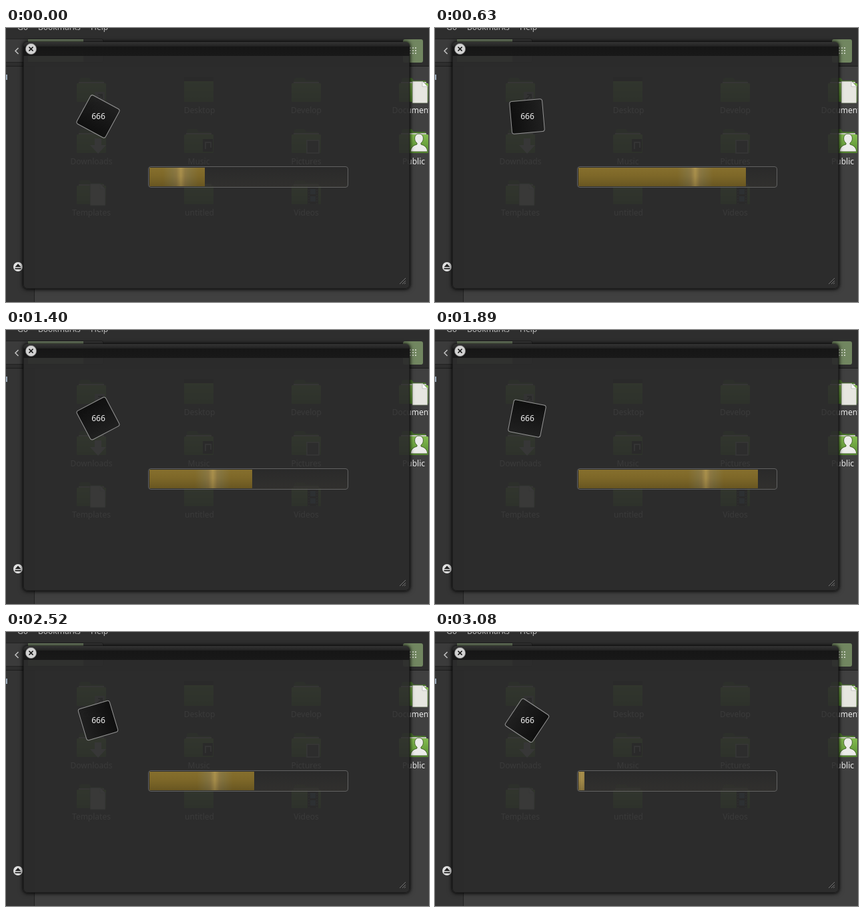
Write an HTML page that moves like this. It is 634x412 px and loops after 3.15 s.

```html
<!DOCTYPE html>
<html lang="en">
<head>
<meta charset="utf-8">
<title>Progress overlay</title>
<style>
html, body { margin: 0; width: 100%; height: 100%; overflow: hidden; background: #404040; }
body { position: relative; font: 12px "Noto Sans", "Open Sans", sans-serif; }
body * { box-sizing: border-box; }
svg, div { position: absolute; }
svg { left: 0; top: 0; }
#win {
  left: 26px; top: 21px; width: 579px; height: 371px; border-radius: 6px;
  background: rgba(44, 44, 44, .93);
  box-shadow: 0 0 4px 1px rgba(0, 0, 0, .75), 0 1px 8px rgba(0, 0, 0, .4);
  border: 1px solid rgba(20, 20, 20, .5);
}
#title {
  left: 26px; top: 21px; width: 579px; height: 21px; border-radius: 6px 6px 0 0;
  background: linear-gradient(rgba(52, 52, 52, .9), rgba(36, 36, 36, .9) 28%, rgba(20, 20, 20, .92) 36%, rgba(23, 23, 23, .92));
}
#track {
  left: 213px; top: 208px; width: 300px; height: 32px; border-radius: 4px;
  border: 1px solid #626262;
  background: linear-gradient(rgba(40, 40, 40, .5), rgba(54, 52, 48, .5));
}
#fill { left: 215px; top: 210px; height: 28px; overflow: hidden; background: #7d6728; }
#glow {
  top: 0; width: 54px; height: 28px;
  background: linear-gradient(90deg, #7d6728, #80703c 28%, #887440 38%, #a68d4a 50%, #887440 62%, #80703c 72%, #7d6728);
}
#shade {
  left: 0; top: 0; width: 100%; height: 100%;
  background: linear-gradient(rgba(255, 220, 120, .07), transparent 45%, rgba(0, 0, 0, .16));
}
#tile {
  left: 112.7px; top: 107.7px; width: 50px; height: 50px; border-radius: 4px;
  border: 1px solid #949494;
  background: linear-gradient(rgba(30, 30, 30, .85), rgba(10, 10, 10, .85));
}
#count {
  left: 113px; top: 125px; width: 51px; text-align: center;
  line-height: 16px; font-weight: 500; color: #f4f4f4;
}
</style>
</head>
<body>
<svg id="desk" width="634" height="412"></svg>
<div id="win"></div>
<div id="title"></div>
<svg width="634" height="412" fill="none">
  <circle cx="37.5" cy="31.5" r="8.2" fill="#d2d2d2" stroke="#666" stroke-width=".8"/>
  <path d="M34.5 28.5l6 6m0-6l-6 6" stroke="#111" stroke-width="1.7"/>
  <path d="M590 385l9-9m-5 9l5-5m-2 5l2-2" stroke="#757575"/>
</svg>
<div id="track"></div>
<div id="fill"><div id="glow"></div><div id="shade"></div></div>
<div id="tile"></div>
<div id="count">666</div>
<script>
const $ = id => document.getElementById(id);
const rect = (x, y, w, h, fill, extra = '') =>
  `<rect x="${x}" y="${y}" width="${w}" height="${h}" fill="${fill}" ${extra}/>`;
const path = (d, fill, extra = '') => `<path d="${d}" fill="${fill}" ${extra}/>`;
const text = (x, y, s, anchor = 'middle', fill = '#eee') =>
  `<text x="${x}" y="${y}" text-anchor="${anchor}" fill="${fill}">${s}</text>`;

// Emblems are drawn relative to the folder's top left corner.
const page = path('M20 5h15l8 8v25H20z', '#e6e6e0', 'stroke="#55604a" stroke-width=".8"') +
  path('M35 5v8h8z', '#fafaf8', 'stroke="#aaa" stroke-width=".6"');
const emblems = {
  Code: rect(27, 21, 15, 15, '#999') + path('M30 33l8-8m-6 0h6v6', 'none', 'stroke="#222" stroke-width="2"'),
  Documents: page,
  Templates: page,
  Downloads: path('M27 14h10v10h7L32 37 20 24h7z', '#d4d4d4'),
  Music: rect(28, 15, 15, 19, '#222') + path('M32 30v-10h8v8', 'none', 'stroke="#aaa" stroke-width="2"'),
  Pictures: rect(23, 17, 18, 19, '#444', 'stroke="#ccc" stroke-width="1.5"'),
  Public: path('M30 7c8 0 8 11 3 14v2q9 2 10 11H17q1-9 10-11v-2c-5-3-5-14 3-14z',
    '#ececea', 'stroke="#46652c"'),
  Videos: rect(24, 9, 16, 27, '#222') + path('M26 10v26m12-26v26', 'none', 'stroke="#999" stroke-dasharray="2 2"') +
    rect(28, 13, 8, 8, '#48748f') + rect(28, 24, 8, 8, '#48748f')
};
const names = ['Code', 'Desktop', 'Develop', 'Documents', 'Downloads', 'Music',
  'Pictures', 'Public', 'Templates', 'untitled', 'Videos'];

function folder(name, i) {
  const x = 128 + i % 4 * 161, y = 75 + Math.floor(i / 4) * 77;
  const body = name === 'Desktop'
    ? rect(0, -1, 44, 37, 'url(#green)') + rect(0, -1, 44, 6, '#202020')
    : path('M4 3q0-3 3-3h12l3 4h18v10H4z', '#46702a') +
      rect(3, 6, 38, 5, '#c4c8bc') + rect(0, 8, 44, 28, 'url(#green)', 'rx="1.5"');
  return `<g transform="translate(${x - 22} ${y})">${body}${emblems[name] || ''}</g>` +
    text(x + (name === 'Desktop' || name === 'untitled' ? 1 : 0), y + 53, name);
}

let dots = '';
for (let i = 0; i < 9; i++) dots += rect(605 + i % 3 * 4, 29 + Math.floor(i / 3) * 4, 2, 2, '#c4ccba');

$('desk').innerHTML =
  '<defs><linearGradient id="green" x2="0" y2="1"><stop stop-color="#84bc50"/>' +
  '<stop offset="1" stop-color="#568c30"/></linearGradient></defs>' +
  rect(0, 0, 634, 57, '#2e2e2e') + rect(0, 57, 634, 1, '#1d1d1d') +
  rect(0, 58, 42, 354, '#343434') + rect(42, 58, 1, 354, '#222') +
  [[17, 'Go'], [48, 'Bookmarks'], [127, 'Help']].map(([x, s]) => text(x, 2.5, s, 'start', '#bbb')).join('') +
  rect(-4, 16.5, 150, 35, '#3b3b3b', 'rx="3" stroke="#222"') +
  rect(33, 17, 83, 34, '#75866a') +
  path('M18.5 30l-4.5 4.5 4.5 4.5', 'none', 'stroke="#c4c4c4" stroke-width="1.5"') +
  rect(595, 17, 30, 35, '#718660', 'rx="3"') + dots +
  rect(0, 70, 2, 8, '#9aa9b8') +
  '<circle cx="18" cy="359" r="7" fill="#e2e2e2"/>' +
  path('M18 354.5l4.5 5h-9zM13.5 361h9v1.7h-9z', '#222') +
  names.map(folder).join('');

// One tick is one percent of the bar and one degree of the tile; the pace varies a little.
const pace = [[0, 28], [630, 84.6], [1050, 121.1], [1400, 151.7], [1890, 190.7], [2520, 252.9], [3080, 303.1]];

function ticks(t) {
  const i = pace.findIndex(p => p[0] >= t);
  if (i < 1) return pace[0][1];
  const [t0, n0] = pace[i - 1], [t1, n1] = pace[i];
  return n0 + (n1 - n0) * (t - t0) / (t1 - t0);
}

function draw() {
  const n = ticks(Math.floor(performance.now() % 3150 / 70) * 70);
  const part = n % 100 / 100, width = 297 * part;
  $('fill').style.width = Math.round(width) + 'px';
  $('glow').style.left = width * (.5 + .23 * part) - 27 + 'px';
  $('tile').style.transform = `rotate(${n + .5}deg)`;
  requestAnimationFrame(draw);
}
draw();
</script>
</body>
</html>
```
